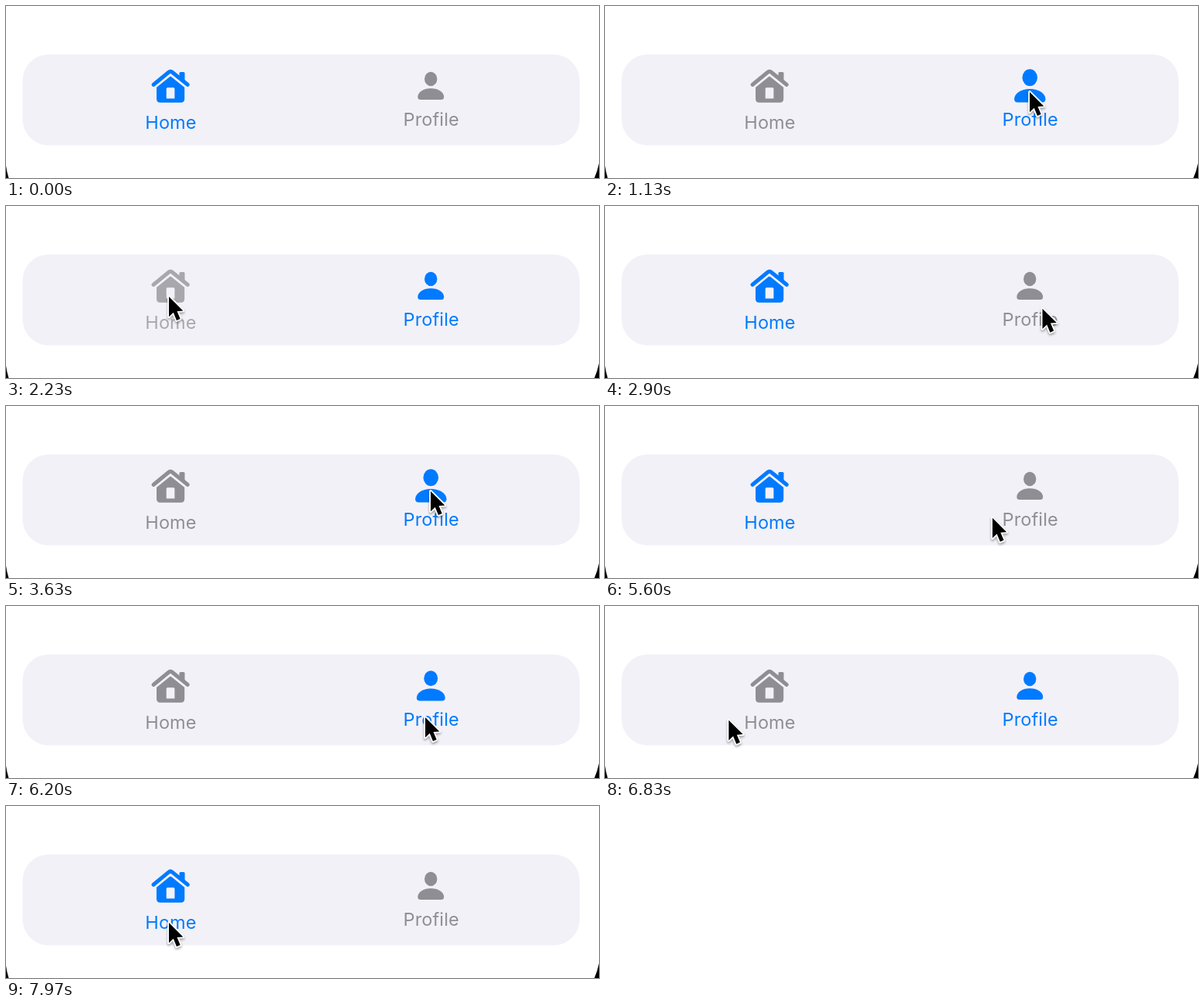
These frames come from a looping animation (768x224 px, 8 s). An HTML page:

```html
<!DOCTYPE html>
<html lang="en">
<head>
<meta charset="utf-8">
<title>Tab bar</title>
<style>
  html, body { margin: 0; width: 100%; height: 100%; overflow: hidden; background: #fff; }
  svg { display: block; width: 768px; height: 224px; }
  text { font: 400 23.5px Inter, Roboto, sans-serif; letter-spacing: .15px; text-anchor: middle; }
  .tab { color: #8e8e93; fill: currentColor; }
  .tab.on { color: #007aff; }
  .tab.down { opacity: .74; }
  .icon { transform-box: view-box; }
  #home .icon { transform-origin: 213px 104px; }
  #profile .icon { transform-origin: 550px 104px; }
  .roof { fill: none; stroke: currentColor; stroke-width: 5; stroke-linecap: round; stroke-linejoin: round; }
  #cursor { filter: drop-shadow(0 2px 1.5px rgba(0, 0, 0, .35)); }
</style>
</head>
<body>
<svg viewBox="0 0 768 224">
  <path d="M0 208Q1 216 3.500 224H0ZM768 205Q766 215 762 224H768Z"/>
  <rect x="21.5" y="63" width="721.5" height="118.5" rx="34" fill="#f2f1f7"/>
  <g class="tab" id="home">
    <g class="icon">
      <path class="roof" d="M191 102.500L211 86Q213 84.500 215 86L235.300 102.500"/>
      <path d="M224.500 92V87.500Q224.500 86 226 86H230Q231.500 86 231.500 87.500V98Z"/>
      <path fill-rule="evenodd" d="M195 106L211.600 92.400Q213 91.300 214.400 92.400L231.200 106V121Q231.200 125.700 226.500 125.700H199.700Q195 125.700 195 121ZM209.200 106.300Q207.700 106.300 207.700 107.800V120.500H218.400V107.800Q218.400 106.300 216.900 106.300Z"/>
    </g>
    <text x="213.500" y="160">Home</text>
  </g>
  <g class="tab" id="profile">
    <g class="icon">
      <ellipse cx="550.200" cy="95" rx="8.200" ry="9.200"/>
      <path d="M537 122Q533.300 122 533.300 118.500C533.300 112 541 107.300 550.200 107.300C559.400 107.300 567.200 112 567.200 118.500Q567.200 122 563.500 122Z"/>
    </g>
    <text x="550.700" y="156">Profile</text>
  </g>
  <g id="cursor">
    <path transform="translate(1 2) scale(1.05)" d="M0 0V25L5.500 19.700L9.500 29.500L14 27.500L10 18L17.500 17.500Z" stroke="#fff" stroke-width="3.500" stroke-linejoin="round" paint-order="stroke"/>
  </g>
</svg>
<script>
const LOOP = 8000, HOLD = 80, PEAK = 150;

const tabs = ['home', 'profile'].map(id => document.getElementById(id));
const cursor = document.getElementById('cursor');

// Taps alternate between the tabs, profile first
const taps = [800, 2230, 3470, 4870, 6070, 7330];

// Cursor trips: leave, arrive, x, y
const entry = [480, 232];
const trips = [
  [200, 570, 549, 110],
  [1450, 2030, 210, 116],
  [2450, 3030, 595, 133],
  [3030, 3330, 549, 109],
  [3870, 4450, 147, 156],
  [4450, 4700, 205, 150],
  [5000, 5820, 542, 143],
  [6460, 6930, 132, 147],
  [6930, 7170, 210, 150]
];

const clamp = u => Math.min(1, Math.max(0, u));
const ease = u => u ** 3 * (10 - 15 * u + 6 * u * u);

function cursorAt(t) {
  let [x, y] = entry;
  for (const [leave, arrive, toX, toY] of trips) {
    const k = ease(clamp((t - leave) / (arrive - leave)));
    x += (toX - x) * k;
    y += (toY - y) * k;
  }
  return [x, y];
}

// Quick swell that peaks once and settles
function bounce(t) {
  const u = Math.max(0, t) / PEAK;
  return 1 + .31 * (u * Math.exp(1 - u)) ** 3;
}

function draw(t) {
  const count = taps.filter(at => at <= t).length;
  const since = count ? t - taps[count - 1] - HOLD : Infinity;
  const held = since < 0;
  const target = count % 2;
  const active = held ? 1 - target : target;

  tabs.forEach((tab, i) => {
    const scale = i === active && isFinite(since) ? bounce(since) : 1;
    tab.classList.toggle('on', i === active);
    tab.classList.toggle('down', held && i === target);
    tab.querySelector('.icon').style.transform = `scale(${scale})`;
  });
  cursor.setAttribute('transform', `translate(${cursorAt(t)})`);
}

const begin = performance.now();
function tick() {
  draw((performance.now() - begin) % LOOP);
  requestAnimationFrame(tick);
}
tick();
</script>
</body>
</html>
```
